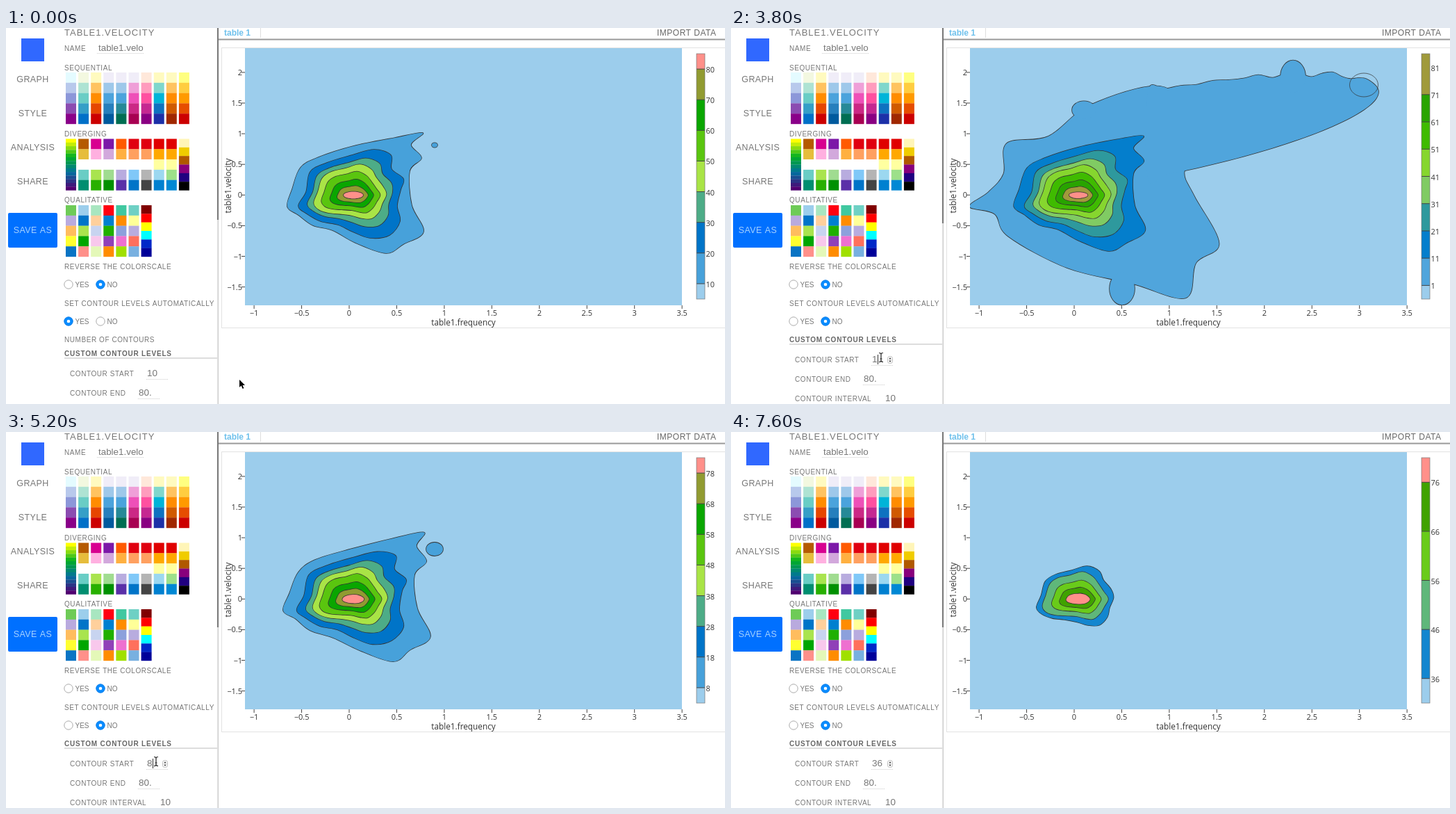
These frames come from a looping animation (1035x541 px, 8 s). An HTML page with a canvas:

```html
<!DOCTYPE html>
<html lang="en">
<head>
<meta charset="utf-8">
<title>Contour levels</title>
<style>
html, body { margin: 0; width: 100%; height: 100%; overflow: hidden; background: #fff; }
canvas { display: block; }
</style>
</head>
<body>
<canvas id="stage" width="1035" height="541"></canvas>
<script>
const ctx = document.getElementById('stage').getContext('2d');
const SANS = '"Liberation Sans", sans-serif', OPEN = '"Open Sans", sans-serif';
const LINE = '#333';

const points = text => text.split(' ').map(pair => pair.split(',').map(Number));
const range = n => Array.from({ length: n }, (_, i) => i);
const mix = (a, b, f) => a.map((v, i) => v + (b[i] - v) * f);

// Value at position f (0 to 1) along evenly spaced stops.
function along(stops, f) {
  const p = f * (stops.length - 1), i = Math.min(stops.length - 2, Math.floor(p));
  return mix(stops[i], stops[i + 1], p - i);
}

function track(keys, t) {
  const i = keys.findIndex(k => k[0] > t);
  if (i < 0) return keys.at(-1).slice(1);
  const [a, b] = [keys[i - 1], keys[i]];
  return mix(a.slice(1), b.slice(1), (t - a[0]) / (b[0] - a[0]));
}

const hexToRgb = hex => [0, 2, 4].map(i => parseInt(hex.slice(i, i + 2), 16));
const css = rgb => `rgb(${rgb.map(v => Math.max(0, Math.min(255, Math.round(v))))})`;

// Stops outside 0..255 keep the mixed colours saturated; they are clamped when drawn.
const SCALE = [[156, 205, 236], [-15, 116, 200], [169, 228, 70], [10, 166, -40], [280, 144, 138]];
const scaleColor = f => css(along(SCALE, f));

// Key outlines, clockwise from the left; others follow on a logarithmic level scale.
const outlines = [
  [2, points('362,257 383,235 402,207 413,172 470,160 530,125 612,104 640,140 650,180 631,207 642,246 672,305 640,330 622,369 555,350 480,329 412,295 392,268')],
  [10, points('405,257 412,232 424,201 450,186 500,170 560,158 600,151 583,168 598,187 581,206 584,255 601,293 572,311 547,324 503,309 470,291 442,284 421,269')],
  [20, points('421,256 432,236 438,207 462,194 498,183 530,175 554,183 555,203 572,217 568,233 563,256 567,278 552,298 524,302 499,293 478,283 453,278 433,267')],
  [45, points('447,251 452,235 458,218 470,209 488,205 506,200 521,207 529,217 537,229 544,240 538,252 532,262 522,270 510,269 498,266 481,265 466,264 453,260')],
  [80, range(18).map(i => [500 - 14 * Math.cos(i * Math.PI / 9), 240.5 - 5 * Math.sin(i * Math.PI / 9)])]
];
// Local peaks that grow as the level falls: x, y, peak level, growth per level, height ratio, tilt
const peaks = [
  [617, 168.5, 11, 4, 0.8, 0], [663, 156, 7, 9, 0.75, 0], [737, 152, 6.5, 11, 0.3, 0],
  [859, 100, 6.5, 11, 0.65, 0], [717, 115, 7, 26, 0.24, -0.27],
  [508, 118, 3, 8.5, 0.75, 0], [809, 70, 3, 9, 1.3, 0], [563, 375, 3, 9, 1.3, 0]
];
const dips = [[742, 127, 13], [643, 117, 5.5], [700, 153, 4.5]];

function outlineAt(level) {
  let i = outlines.findIndex(([key], n) => n && key >= level);
  if (i < 0) i = outlines.length - 1;
  const [[low, a], [high, b]] = [outlines[i - 1], outlines[i]];
  const f = Math.log(level / low) / Math.log(high / low);
  return a.map((p, n) => mix(p, b[n], f));
}

// Tapering ridge to the upper right, with a wavy upper edge.
function ridge(level) {
  const length = 332 * level ** -0.12, half = 62 * level ** -0.35, steps = 22;
  const edge = side => range(steps + 1).map(i => {
    const u = Math.sin(i / steps * Math.PI / 2), x = 600 + length * u;
    const wave = side < 0 ? -6 * u * (1 - u ** 8) * Math.cos((x - 808) / 54 * 2 * Math.PI) : 0;
    return [x, 154 - 62 * u + side * half * Math.sqrt(1 - u * u) + wave];
  });
  return [...edge(-1), ...edge(1).reverse().slice(1)];
}

function smoothPath(pts) {
  const path = new Path2D(), n = pts.length;
  const at = i => pts[(i + n) % n];
  path.moveTo(...pts[0]);
  for (let i = 0; i < n; i++) {
    const [a, b, c, d] = [at(i - 1), at(i), at(i + 1), at(i + 2)];
    path.bezierCurveTo(b[0] + (c[0] - a[0]) / 6, b[1] + (c[1] - a[1]) / 6,
      c[0] - (d[0] - b[0]) / 6, c[1] - (d[1] - b[1]) / 6, ...c);
  }
  path.closePath();
  return path;
}

function ellipse(x, y, rx, ry = rx, tilt = 0) {
  const path = new Path2D();
  path.ellipse(x, y, rx, ry, tilt, 0, 2 * Math.PI);
  return path;
}

function rect(x, y, w, h, color) {
  ctx.fillStyle = color;
  ctx.fillRect(x, y, w, h);
}

function fill(path, color) {
  ctx.fillStyle = color;
  ctx.fill(path);
}

function stroke(path, color, width = 1) {
  ctx.strokeStyle = color;
  ctx.lineWidth = width;
  ctx.stroke(path);
}

function text(str, x, y, size, { color = '#777', spacing = 0, font = SANS, align = 'left', weight = '' } = {}) {
  ctx.font = `${weight} ${size}px ${font}`;
  ctx.letterSpacing = spacing + 'px';
  ctx.textAlign = align;
  ctx.fillStyle = color;
  ctx.fillText(str, x, y);
}

const label = (str, x, y) => text(str, x, y, 10, { spacing: 0.57 });

function dotted(x, y, w) {
  for (let i = 0; i < w; i += 2) rect(x + i, y, 1, 1, '#ccc');
}

// Each column is a ramp through its key colours.
function swatches(top, columns, rowsOf) {
  columns.forEach((column, i) => {
    const keys = column.split(' ').map(hexToRgb), rows = rowsOf(keys.length), h = 74 / rows;
    range(rows).forEach(j =>
      rect(86 + 18.1 * i, top + j * h, 15, h + 0.2, css(along(keys, j / (rows - 1)))));
  });
}

const sequential = [
  'e4fbff 8c97d9 8a0089', 'f3f8e0 69cdc5 0070c8', 'fffabf ff8c00 cc0000', 'f0edf8 4ba3dc 005a9e',
  'f0edf8 4ba3dc 006e52', 'f0edf8 ee50b8 a80052', 'ffe8da ff50a0 8a0082', 'fffabf 00b4d8 1c30a8',
  'fffabf ff8c00 a02800', 'ffff80 ff9a00 cc0000'];
const diverging = [
  'ffff00 00b020 0070a0 500070',
  'b55a00 e6bd3c ffffff 69cdc5 008e70', 'd80090 ffb0e0 ffffff a9e44e 28b000',
  '7c18a8 d2a8dc ffffff a0dc90 009000', 'ff5a00 ffb040 ffffff b8acdf 5a30a8',
  'e00010 ffa060 ffffff 80c8f8 0074c8', 'e00010 ffa060 ffffff b4b4b4 444444',
  'e00000 ffa800 ffffa0 9cd8f0 0080d0', 'e00000 ffa800 ffffa0 9de08a 0088d4',
  'fff5b8 f0cc00 b05800 88007c 200080 000000'];
const qualitative = [
  '6ecb57 b9aade ffbd5e ffff30 0a74c4', '9cceec 0074c8 a9e44e 00a600 ff908a',
  'a8e6c0 ffd09c c8d4f0 f8c8ec e4f8b8', 'ff0010 0080d0 20b000 9040b8 ff8c00',
  '40c8a0 ff8c00 8ca0dc ee70d0 a0e000', '6ed0c4 ffff98 b8acdf ff705c 78b0e0',
  '800000 ff0000 ffff00 00ffff 0028c8 000099'];

function radio(x, y, name, on) {
  fill(ellipse(x, y, 6.3), on ? '#0a8cff' : '#fff');
  stroke(ellipse(x, y, 6.2), on ? '#0a7ce8' : '#aaa');
  if (on) fill(ellipse(x, y, 2.3), '#fff');
  text(name, x + 9.5, y + 4, 10);
}

function drawPanel(t, start) {
  const custom = t >= 1000;
  const nav = { spacing: 0.4, align: 'center' };
  rect(22, 15, 33, 33, '#3068ff');
  ['GRAPH', 'STYLE', 'ANALYSIS', 'SHARE'].forEach((name, i) =>
    text(name, 38.5, 77.5 + 49.3 * i, 12.5, nav));
  const button = new Path2D();
  button.roundRect(3, 266, 71, 50, 2);
  fill(button, '#0070ff');
  text('SAVE AS', 38.5, 295, 12.5, { ...nav, color: '#a4d2ff' });

  text('TABLE1.VELOCITY', 84, 11, 13, { spacing: 1 });
  label('NAME', 84, 33);
  text('table1.velo', 133, 33, 13.4);
  dotted(131, 36, 67);
  label('SEQUENTIAL', 84, 61);
  swatches(64, sequential, () => 5);
  label('DIVERGING', 84, 156);
  swatches(159.5, diverging, n => n === 4 ? 14 : n);
  label('QUALITATIVE', 84, 251);
  swatches(255, qualitative, n => n);
  label('REVERSE THE COLORSCALE', 84, 347);
  radio(90, 369, 'YES', false);
  radio(136, 369, 'NO', true);
  label('SET CONTOUR LEVELS AUTOMATICALLY', 84, 400);
  radio(90, 422, 'YES', !custom);
  radio(136, 422, 'NO', custom);

  if (!custom) label('NUMBER OF CONTOURS', 84, 452);
  const y = custom ? 452 : 472;
  text('CUSTOM CONTOUR LEVELS', 84, y, 10, { spacing: 0.8, weight: 'bold', color: '#666' });
  rect(84, y + 2.5, 220, 1, '#bbb');
  [['START', start, 203], ['END', '80.', 191], ['INTERVAL', 10, 222]].forEach(([name, value, x], i) => {
    const row = y + 29 + 28 * i;
    label('CONTOUR ' + name, 92, row);
    text(value, x, row, 13.5);
    dotted(x - 1, row + 4, 32);
  });
  if (t >= 1800) {
    const spinner = new Path2D();
    spinner.roundRect(225.5, 472.5, 7, 10, 3);
    stroke(spinner, '#bbb');
    fill(new Path2D('M227 476.5l2-2.5 2 2.5zM227 478.5l2 2.5 2-2.5z'), '#555');
    if (t < 7600) rect(start > 9 ? 218 : 211, 470, 1, 14, LINE);
  }
  rect(304.5, 0, 1.5, 541, '#ccc');
  rect(304, 0, 2, custom ? 281 : 276, '#777');
}

function drawAxes() {
  text('table 1', 314, 10.5, 12, { weight: 'bold', color: '#6fc1ec' });
  rect(366, 0, 1, 14, '#ddd');
  rect(306, 15.5, 729, 2, '#999');
  text('IMPORT DATA', 937, 11, 12, { spacing: 0.5, color: '#666' });
  ctx.strokeStyle = '#e2e2e2';
  ctx.lineWidth = 1;
  ctx.strokeRect(310.5, 28.5, 740, 403);

  const style = { font: OPEN, color: LINE };
  const centered = { ...style, align: 'center' };
  const number = v => String(v).replace('-', '−');
  for (let v = -1; v <= 3.5; v += 0.5) {
    const x = 494 + 136.9 * v;
    rect(x - 0.5, 399, 1, 5, '#444');
    text(number(v), x, 414, 11, centered);
  }
  for (let v = -1.5; v <= 2; v += 0.5) {
    const y = 240.3 - 88.2 * v;
    rect(339, y - 0.5, 5, 1, '#444');
    text(number(v), 340, y + 4, 11, { ...style, align: 'right' });
  }
  text('table1.frequency', 658.5, 428, 11.8, centered);
  ctx.save();
  ctx.translate(324, 227);
  ctx.rotate(-Math.PI / 2);
  text('table1.velocity', 0, 0, 11.8, centered);
  ctx.restore();
}

// Strokes go under the fills so that overlapping parts merge into one outline.
function drawContour(level, color) {
  const parts = [smoothPath(outlineAt(level))];
  if (level < 5) parts.push(smoothPath(ridge(level)));
  for (const [x, y, peak, growth, ratio, tilt] of peaks) {
    const r = growth * (peak - level);
    if (level < peak && level >= peak - 4) parts.push(ellipse(x, y, r, r * ratio, tilt));
  }
  parts.forEach(p => stroke(p, LINE, 1.6));
  parts.forEach(p => fill(p, color));
  if (level === 1) stroke(ellipse(911, 82, 20.5, 17), LINE, 0.7);
  if (level === 2) dips.forEach(([x, y, r]) => {
    const dip = ellipse(x, y, r, r * 0.8);
    fill(dip, scaleColor(0));
    stroke(dip, LINE, 0.7);
  });
}

function drawChart(start) {
  const levels = [];
  for (let v = start; v < 81.5; v += 10) levels.push(v);
  const n = levels.length, color = i => scaleColor(i / n);

  ctx.save();
  ctx.beginPath();
  ctx.rect(344, 29, 629, 370);
  ctx.clip();
  rect(344, 29, 629, 370, color(0));
  levels.forEach((level, i) => drawContour(level, color(i + 1)));
  ctx.restore();

  const band = 353 / n;
  rect(994, 37, 12, 353, color(0));
  levels.forEach((level, i) => {
    const y = 390 - band * (i + 0.5);
    if (level <= 80) {
      rect(994, 37, 12, y - 37, color(i + 1));
      rect(994, y - 0.5, 12, 1, '#444');
    }
    text(level, 1007.5, y + 5, 11, { font: OPEN, color: LINE });
  });
  ctx.strokeStyle = '#777';
  ctx.lineWidth = 0.7;
  ctx.strokeRect(994, 37, 12, 353);
}

const pointerKeys = [[0, 336, 506], [600, 138, 421], [1000, 138, 421], [1200, 216, 500], [1800, 216, 474]];
const startKeys = [[0, 10], [2000, 10], [3800, 1], [4400, 1], [4600, 2], [6000, 15], [7600, 36]];

function drawPointer(t) {
  if (t >= 7600) return;
  ctx.save();
  ctx.translate(...track(pointerKeys, t));
  if (t < 1200) {
    const arrow = new Path2D('M0 0V11L2.6 8.6 4.6 13 6.4 12.2 4.5 8H8z');
    stroke(arrow, '#fff', 1.5);
    fill(arrow, '#000');
  } else {
    stroke(new Path2D('M-3-6.5Q0-6.5 0-4.5Q0-6.5 3-6.5M0-5V5M-3 6.5Q0 6.5 0 4.5Q0 6.5 3 6.5M-1.5 2H1.5'), '#222', 1.2);
  }
  ctx.restore();
}

function frame(now) {
  let t = Math.floor(now % 8000 / 200) * 200;
  if (t > 1200 && t < 1800) t = 1200;
  const start = Math.round(track(startKeys, t)[0]);
  rect(0, 0, 1035, 541, '#fff');
  drawPanel(t, start);
  drawChart(start);
  drawAxes();
  drawPointer(t);
  requestAnimationFrame(frame);
}
requestAnimationFrame(frame);
</script>
</body>
</html>
```
